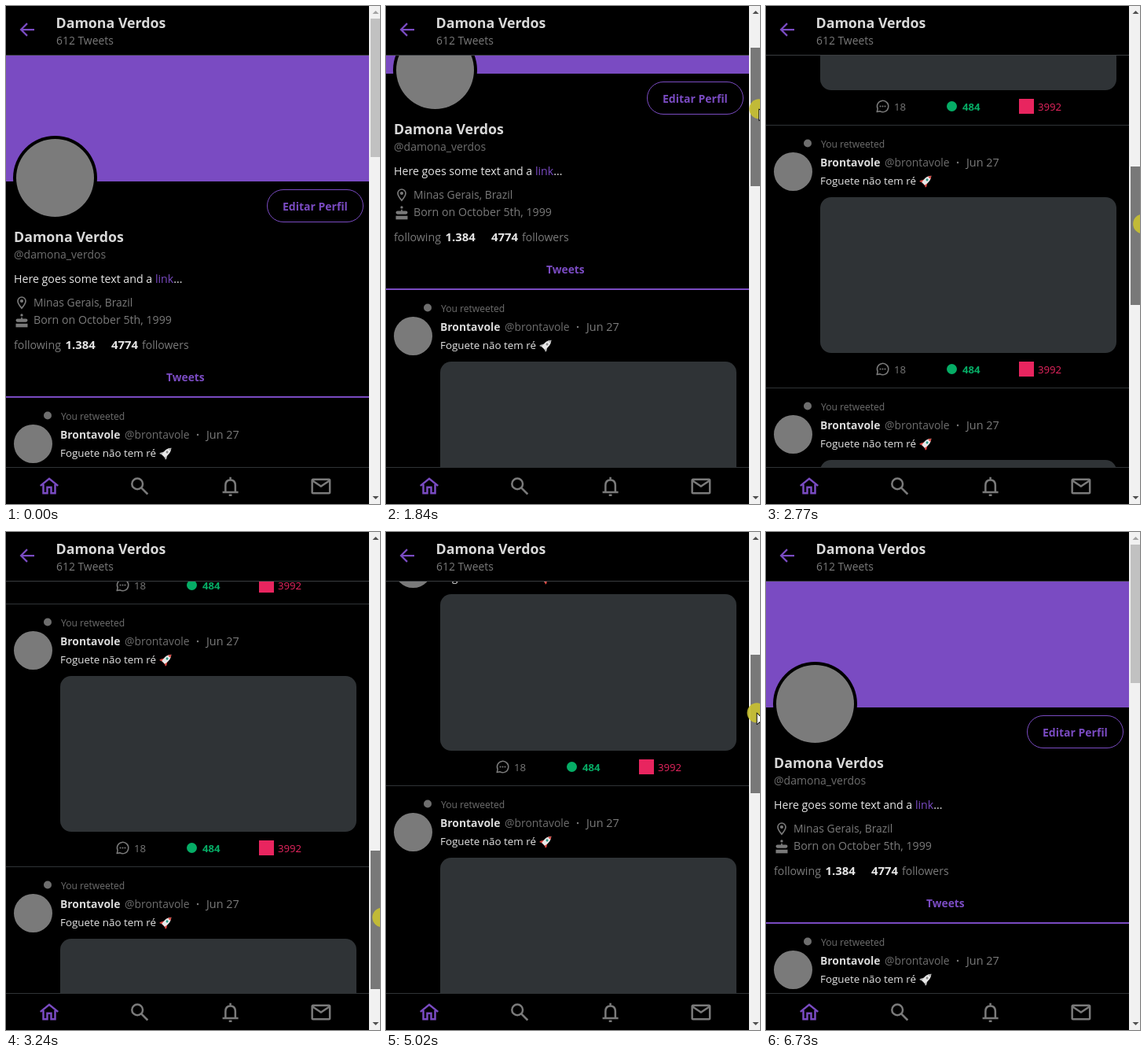
Write an HTML page that moves like this. It is 476x633 px and loops after 7.12 s.

```html
<!DOCTYPE html>
<html lang="en">
<head>
<meta charset="utf-8">
<title>Profile scroll</title>
<style>
  html, body { margin: 0; width: 100%; height: 100%; overflow: hidden; background: #000; }
  svg { display: block; width: 476px; height: 633px; font-family: "Open Sans", "Noto Sans", sans-serif; }
  text { white-space: pre; }
  .b { font-weight: 700; }
</style>
</head>
<body>
<svg id="stage" viewBox="0 0 476 633" xmlns="http://www.w3.org/2000/svg"></svg>
<script>
const LOOP = 7120, STEP = 77, RELEASE = 6730;
const MAX = 1540, RATIO = 3.622, TRACK = 16, GRIP = 73;
const FIRST = 498, PITCH = 334.5, TWEETS = 5, CARD_TOP = 91, CARD_END = 289.5;
const PURPLE = '#7a4bc2', GREY = '#7a7a7a', DIM = '#6e6e6e', LIGHT = '#d9d9d9', WHITE = '#e6e6e6',
      GREEN = '#06ad66', PINK = '#e8255f', LINE = '#2f3336';

// The pointer comes in, then drags the thumb in strokes.
// "to" is the thumb's travel in pixels; it may overshoot the track.
const approach = { start: 300, end: 530 };
const strokes = [
  { start: 840, end: 2300, to: 156.8, easeIn: 5, easeOut: 1.5 },
  { start: 2450, end: 2770, to: 187.9, easeIn: 1, easeOut: 1.5 },
  { start: 3000, end: 3630, to: 466.3, easeIn: 1.3, easeOut: 3 },
  { start: 4090, end: 4470, to: 263.7, easeIn: 2, easeOut: 3 },
  { start: 4780, end: 5020, to: 140.8, easeIn: 2, easeOut: 2 },
  { start: 5330, end: 5690, to: -74, easeIn: 1.5, easeOut: 1.5 }
];
strokes.forEach((m, i) => m.from = i ? strokes[i - 1].to : 0);

const text = (x, y, size, fill, str, bold) =>
  `<text x="${x}" y="${y}" font-size="${size}" fill="${fill}"${bold ? ' class="b"' : ''}>${str}</text>`;
const rect = (x, y, w, h, fill, extra = '') =>
  `<rect x="${x}" y="${y}" width="${w}" height="${h}" fill="${fill}" ${extra}/>`;
const circle = (x, y, r, fill) => `<circle cx="${x}" cy="${y}" r="${r}" fill="${fill}"/>`;
const line = d => `<path d="${d}"/>`;

// Outline icons on a 24-unit grid
const icons = {
  back: line('M20 12H5M12 5L5 12L12 19'),
  home: line('M3 11.5L12 4.3L21 11.5M6 10V19H10V13H14V19H18V10'),
  search: '<circle cx="9.5" cy="9.5" r="5.5"/>' + line('M13.5 13.5L20 20'),
  bell: line('M7 18V11Q7 5.5 12 5.5T17 11V18M4 18H20M12 2.5V5M10.5 21H13.5'),
  mail: '<rect x="3" y="5" width="18" height="14" rx="1"/>' + line('M3 6L12 12L21 6'),
  pin: line('M12 20Q6 13 6 9A6 6 0 0 1 18 9Q18 13 12 20z') + circle(12, 9, 1.5, GREY),
  cake: circle(12, 3.5, 1, GREY) + line('M12 7V10') +
    rect(4, 10, 16, 3, GREY, 'rx="1.5"') + rect(4, 17.5, 16, 3.5, GREY)
};
const icon = (name, x, y, size, color) =>
  `<g transform="translate(${x} ${y}) scale(${size / 24})" fill="none" stroke="${color}" stroke-width="2">${icons[name]}</g>`;

const profile =
  rect(0, 63, 462, 160, PURPLE) +
  circle(62.5, 218.5, 53.5, '#000') + circle(62.5, 218.5, 49.5, '#7b7b7b') +
  rect(332.5, 233.5, 122, 41, '#000', `id="edit" rx="20.5" stroke="${PURPLE}"`) +
  text(352, 260, 14, PURPLE, 'Editar Perfil', true) +
  text(10, 300, 17.8, LIGHT, 'Damona Verdos', true) +
  text(10, 321, 14, DIM, '@damona_verdos') +
  text(10, 352, 14.2, WHITE, `Here goes some text and a <tspan fill="${PURPLE}">link</tspan>...`) +
  icon('pin', 10, 367.5, 20, GREY) + text(35, 382, 13.9, GREY, 'Minas Gerais, Brazil') +
  icon('cake', 10, 390, 20, GREY) + text(35, 404, 14.2, GREY, 'Born on October 5th, 1999') +
  text(10, 436, 14.2, GREY, 'following') + text(75.5, 436, 14.9, WHITE, '1.384', true) +
  text(134, 436, 14.9, WHITE, '4774', true) + text(173, 436, 14, GREY, 'followers') +
  text(204, 477, 13.8, PURPLE, 'Tweets', true) +
  rect(0, 496, 462, 2, PURPLE);

const rocket = `<g transform="translate(204 70) rotate(45)">
  <path class="accent" d="M-3 1L-5.5 5V7L-2 5.5H2L5.5 7V5L3 1z"/>
  <path d="M0 -9Q5 -4 2.6 5.5H-2.6Q-5 -4 0 -9z" fill="#e8e8e8"/>
  <path class="accent" d="M0 -9L2.4 -5.2H-2.4z"/>
  <circle class="porthole" cy="-1.5" r="1.5"/>
</g>`;

const post =
  rect(0, -1, 462, 1, LINE) +
  circle(53, 22.5, 5, DIM) + text(70, 28, 12.1, DIM, 'You retweeted') +
  circle(34.5, 58.5, 24.5, GREY) +
  text(69, 52, 13.9, LIGHT, 'Brontavole', true) + text(151, 52, 13.9, DIM, '@brontavole') +
  circle(244, 47, 1.2, GREY) + text(255, 52, 14.4, GREY, 'Jun 27') +
  text(69, 75, 13.4, WHITE, 'Foguete não tem ré') + rocket +
  rect(69, CARD_TOP, 377, 199, LINE, 'rx="14" class="card"');

const bubble = `<path d="M141.2 27.5L142.2 23.8A7.2 7.2 0 1 1 144.9 26.7z" fill="none"
  stroke="${GREY}" stroke-width="1.5" stroke-linejoin="round"/>` +
  [-3, 0, 3].map(d => circle(148.5 + d, 20.5, 1, GREY)).join('');

const actions =
  bubble + text(163, 26, 13.2, GREY, '18') +
  circle(236.5, 20.5, 6.5, GREEN) + text(250, 26, 13.2, GREEN, '484', true) +
  rect(322, 11, 19, 19, PINK) + text(346, 26, 13.2, PINK, '3992');

const navIcons = ['home', 'search', 'bell', 'mail'].map((name, i) =>
  icon(name, 40 + 115.3 * i, 595.5, 30, i ? GREY : PURPLE)).join('');

const bars =
  rect(0, 0, 462, 63, '#000') + rect(0, 62, 462, 1, '#3a3d40') +
  icon('back', 13.5, 16.5, 27, PURPLE) +
  text(63.5, 28, 17.8, LIGHT, 'Damona Verdos', true) + text(64, 49, 13.9, GREY, '612 Tweets') +
  rect(0, 586, 462, 47, '#000') + rect(0, 586, 462, 1, LINE) + navIcons;

const scrollbar =
  rect(462, 0, 14, 633, '#f1f1f1') + rect(464, TRACK, 13, 176, '#c1c1c1', 'id="thumb"') +
  '<path id="up" d="M466.5 10L470.5 6L474.5 10z"/><path id="down" d="M466.5 623L470.5 627L474.5 623z"/>';

const pointer = `<g id="pointer"><circle r="12.5" fill="#c8c032" opacity=".92"/>
  <path d="M0 0V15L3.5 11.8L6 17L8 16L5.7 11H10.5z" fill="#fff" stroke="#000"/></g>`;

const $ = id => document.getElementById(id);
const all = name => [...document.getElementsByClassName(name)];
$('stage').innerHTML = rect(0, 0, 476, 633, '#000') +
  `<g class="post">${post}</g><g class="actions">${actions}</g>`.repeat(TWEETS) +
  `<g id="profile">${profile}</g>` + bars + scrollbar + pointer;
const posts = all('post'), rows = all('actions'), cards = all('card'),
      accents = all('accent'), portholes = all('porthole');

const clamp = (v, lo, hi) => Math.max(lo, Math.min(hi, v));
const mix = (a, b, p) => a + (b - a) * p;
const stepCount = m => Math.round((m.end - m.start) / STEP);
const stepAt = (m, t) =>
  clamp(Math.floor((t - m.start) / (m.end - m.start) * stepCount(m) + 0.02), 0, stepCount(m));

function travel(m, step) {
  const p = Math.min(1, (step + 1) / (stepCount(m) + 1));
  return mix(m.from, m.to, 1 - (1 - p ** m.easeIn) ** m.easeOut);
}

function pose(t) {
  const gripY = TRACK + GRIP;
  if (t < approach.start) return { s: 0, x: 520, y: gripY };
  if (t < strokes[0].start) {
    const p = stepAt(approach, t) / stepCount(approach), e = 1 - (1 - p) ** 2;
    return { s: 0, x: mix(400, 472.5, e), y: mix(492, gripY, e) };
  }
  const m = strokes.filter(m => t >= m.start).pop();
  const step = stepAt(m, t), q = mix(m.start, m.end, step / stepCount(m));
  const sway = 4.2 * Math.sin((q - 1940) / 3640 * 2 * Math.PI);
  const leave = 25 * clamp((q - 5620) / 70, 0, 1);
  return {
    s: clamp(Math.round(travel(m, step) * RATIO), 0, MAX),
    x: 475.5 + sway + leave,
    y: gripY + travel(m, step + 0.3) // the page lags a little behind the pointer
  };
}

const move = (el, x, y) => el.setAttribute('transform', `translate(${x} ${y})`);
const paint = (el, fill) => el.setAttribute('fill', fill);

function draw(t) {
  const { s, x, y } = pose(t);
  move($('profile'), 0, -s);
  for (let i = 0; i < TWEETS; i++) {
    const top = FIRST + PITCH * i - s, y0 = Math.round(top), y1 = Math.round(top + CARD_END);
    move(posts[i], 0, y0);
    move(rows[i], 0, y1);
    cards[i].setAttribute('height', y1 - y0 - CARD_TOP);
  }

  const muted = s < 300;
  accents.forEach(el => paint(el, muted ? '#b5b5b5' : '#d8453f'));
  portholes.forEach(el => paint(el, muted ? '#8a8a8a' : '#2a9a86'));

  const overEdit = x > 333 && x < 455 && y > 233 && y < 275;
  paint($('edit'), overEdit ? '#011017' : '#000');

  const held = t >= approach.end && t < RELEASE;
  const hover = x > 464 && x < 476 && y < 192;
  $('thumb').setAttribute('y', Math.floor(TRACK + s / RATIO));
  paint($('thumb'), held ? '#787878' : hover ? '#a8a8a8' : '#c1c1c1');
  paint($('up'), s > 0 ? '#505050' : '#a3a3a3');
  paint($('down'), s < MAX ? '#505050' : '#a3a3a3');
  move($('pointer'), x, y);
}

const start = performance.now();
function tick() {
  draw((performance.now() - start) % LOOP);
  requestAnimationFrame(tick);
}
tick();
</script>
</body>
</html>
```
